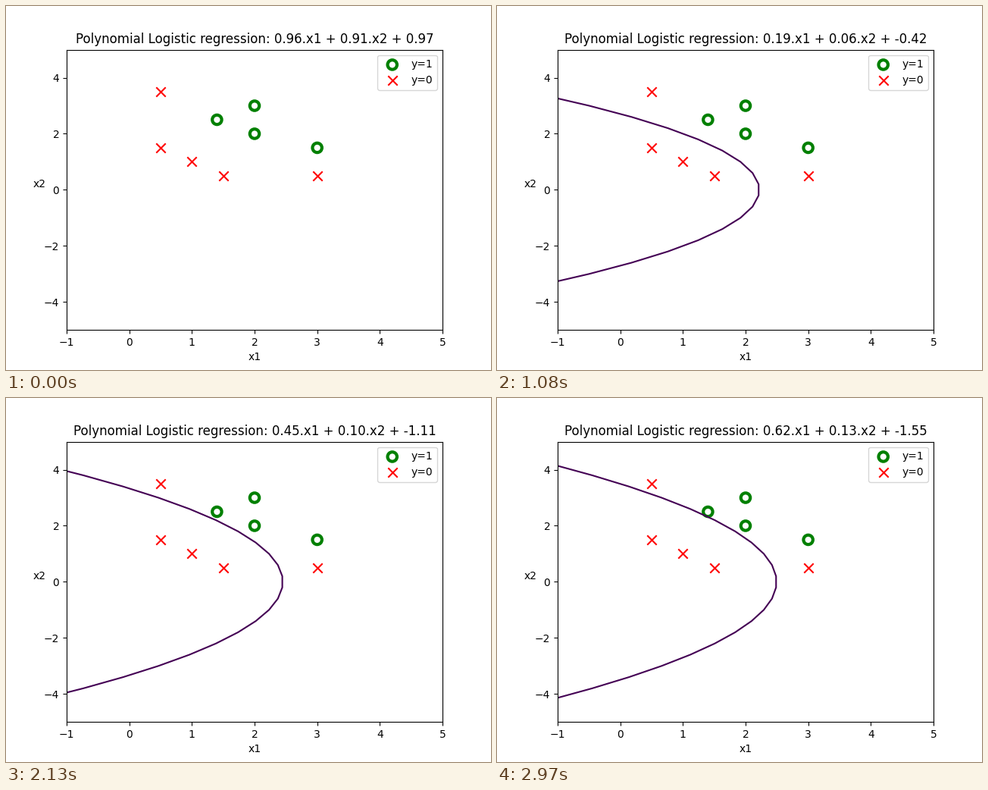
A matplotlib script for the animation above (3.66 s loop, 640 by 480 pixels).

```python
import numpy as np
import matplotlib.pyplot as plt
from matplotlib.animation import FuncAnimation

INTERVAL = 30        # ms per frame
FRAMES = 122         # one loop of 3660 ms
SHOTS = 100          # the remaining frames hold the final fit
STEPS_PER_SHOT = 5
RATE = 0.05

ones = np.array([(1.4, 2.5), (2, 3), (2, 2), (3, 1.5)])
zeros = np.array([(0.5, 3.5), (0.5, 1.5), (1, 1), (1.5, 0.5), (3, 0.5)])


def fit():
    """Gradient descent on a*x1 + b*x2^2 + c, sampled every few steps."""
    pts = np.vstack([ones, zeros])
    X = np.column_stack([pts[:, 0], pts[:, 1] ** 2, np.ones(len(pts))])
    y = np.repeat([1.0, 0.0], [len(ones), len(zeros)])
    theta = np.ones(3)
    shots = []
    for step in range(SHOTS * STEPS_PER_SHOT):
        p = 1 / (1 + np.exp(-X @ theta))
        theta = theta - RATE * X.T @ (p - y) / len(y)
        if step % STEPS_PER_SHOT == 0:
            shots.append(theta)
    return shots


shots = fit()
rows = np.linspace(-5, 5, 26)

fig, ax = plt.subplots(figsize=(6.4, 4.8), dpi=100)
ax.set(xlim=(-1, 5), ylim=(-5, 5), xlabel="x1")
ax.set_ylabel("x2", rotation=0)
ax.scatter(*ones.T, s=80, marker="o", facecolors="none", edgecolors="green",
           linewidths=3, label="y=1")
ax.scatter(*zeros.T, s=80, marker="x", c="red", label="y=0")
ax.legend(loc="upper right")
boundary, = ax.plot([], [], color="#440154", lw=1.5, solid_capstyle="butt")
title = ax.set_title("")


def update(i):
    a, b, c = shots[min(i, SHOTS - 1)]
    boundary.set_data(-(b * rows ** 2 + c) / a, rows)
    title.set_text("Polynomial Logistic regression: "
                   f"{a:.2f}.x1 + {b:.2f}.x2 + {c:.2f}")
    return boundary, title


anim = FuncAnimation(fig, update, frames=FRAMES, interval=INTERVAL,
                     init_func=lambda: update(0), repeat=True, repeat_delay=0)
plt.show()
```
